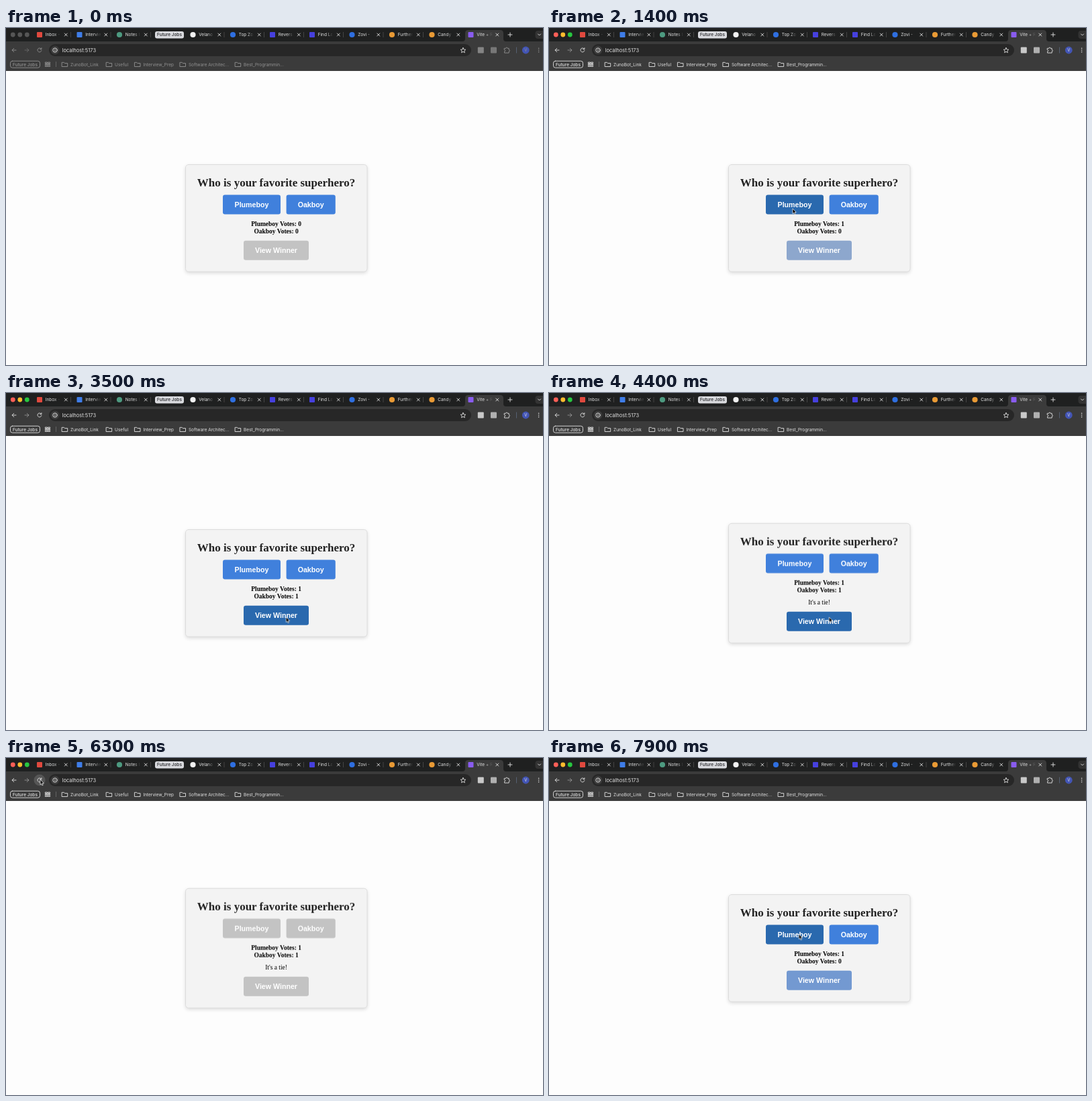
These frames come from a looping animation (800x502 px, 8000 ms). An HTML page:

```html
<!DOCTYPE html>
<html lang="en">
<head>
<meta charset="utf-8">
<title>Superhero vote</title>
<style>
  html, body { margin: 0; width: 100%; height: 100%; overflow: hidden; background: #fdfdfd; }
  svg { display: block; width: 800px; height: 502px; }
  .ui { font-family: Inter, Roboto, sans-serif; font-size: 6.5px; fill: #e3e3e3; }
  .ui .now { fill: currentColor; }
  .line { fill: none; stroke: currentColor; stroke-width: .9; stroke-linecap: round; stroke-linejoin: round; }
  .mid { text-anchor: middle; }
  .serif { font-family: "Liberation Serif", "Times New Roman", serif; font-size: 9.47px; text-anchor: middle; }
  .bold { font-weight: 700; }
  .btn { font: 700 10.65px "Liberation Sans", Arial, sans-serif; fill: #fff; text-anchor: middle; }
  .card { fill: #f3f3f3; stroke: #dcdcdc; filter: drop-shadow(0 2px 2.5px rgba(0, 0, 0, .13)); }
</style>
</head>
<body>
<svg viewBox="0 0 800 502">
  <defs>
    <linearGradient id="fade"><stop stop-color="#1f2020" stop-opacity="0"/><stop offset="1" stop-color="#1f2020"/></linearGradient>
    <linearGradient id="fadeOn"><stop stop-color="#3b3b3b" stop-opacity="0"/><stop offset="1" stop-color="#3b3b3b"/></linearGradient>
  </defs>
  <rect width="800" height="502" fill="#fdfdfd"/>

  <g class="ui">
    <rect width="800" height="64" fill="#1f2020"/>
    <rect y="20" width="800" height="44" fill="#3b3b3b"/>
    <path d="M680 20q4 0 4-4V8q0-5 5-5h47q5 0 5 5v8q0 4 4 4z" fill="#3b3b3b"/>
    <g id="lights"></g>
    <g id="tabs"></g>
    <rect x="222" y="5" width="43" height="10.4" rx="3" fill="#d9dade"/>
    <text class="mid" x="243.5" y="12.4" style="fill:#202124;font-weight:500">Future Jobs</text>
    <path class="line" d="M748 10h6M751 7v6" color="#e3e3e3"/>
    <rect x="788.5" y="4" width="16" height="12" rx="4" fill="#333"/>
    <path class="line" d="M792.6 9l2 2 2-2" color="#e3e3e3"/>
    <rect x="64" y="24" width="629" height="18" rx="9" fill="#272727"/>
    <circle cx="73" cy="33" r="6.5" fill="#3b3b3b"/>
    <circle class="line" cx="73" cy="33" r="3.2" color="#e3e3e3"/>
    <path class="line" d="M73 32.7v1.7M73 31.3v.1" color="#e3e3e3"/>
    <text x="83.6" y="35.7" style="font-size:7.5px">localhost:5173</text>
    <path class="line" d="M681 29.4l1.1 2.5 2.7.3-2 1.8.6 2.7-2.4-1.4-2.4 1.4.6-2.7-2-1.8 2.7-.3z" color="#dcdcdc"/>

    <g id="nav">
      <path class="line" d="M15 33H9.2M11.8 30.3L9.1 33l2.7 2.7"/>
      <path class="line" d="M28 33h5.8M31.2 30.3l2.7 2.7-2.7 2.7" opacity=".5"/>
      <circle id="reloadHover" cx="50" cy="33" r="8.5" fill="#565656"/>
      <path class="line" d="M52.6 31.4a3 3 0 1 0 .3 2.2M52.9 29.6v2.1h-2.1"/>
      <rect class="now" x="702.8" y="28.5" width="9" height="9" rx="1" opacity=".85"/>
      <rect class="now" x="722" y="28.5" width="9" height="9" rx="1" opacity=".7"/>
      <path class="line" d="M742.6 30.3h2.1a1.2 1.2 0 0 1 2.4 0h2.1v2.2a1.2 1.2 0 0 1 0 2.4v2.2h-6.6v-2.2a1.2 1.2 0 0 0 0-2.4z"/>
      <path d="M760.5 28.5v9" stroke="#5c6a80" stroke-width=".8"/>
      <circle cx="774.3" cy="33" r="5.4" fill="#4355b5"/>
      <text class="mid now" x="774.3" y="35.1" style="font-size:6px">V</text>
      <g class="now"><circle cx="793.6" cy="30.2" r=".8"/><circle cx="793.6" cy="33" r=".8"/><circle cx="793.6" cy="35.8" r=".8"/></g>
      <rect class="line" x="6.5" y="49.2" width="44" height="10" rx="3"/>
      <text class="mid now" x="28.5" y="56.6" style="font-weight:500">Future Jobs</text>
      <g id="marks"></g>
    </g>
  </g>

  <g id="shortCard"><rect class="card" x="267.5" y="203.5" width="270.5" height="159.5" rx="4.5"/></g>
  <g id="tallCard">
    <rect class="card" x="267.5" y="194.3" width="270.5" height="178" rx="4.5"/>
    <text class="serif" x="402.6" y="315.4">It's a tie!</text>
  </g>
  <g id="upper">
    <text class="serif bold" x="402.6" y="236" style="font-size:17px" fill="#222">Who is your favorite superhero?</text>
    <rect id="first" x="323" y="248.5" width="86" height="29" rx="3.2"/>
    <text class="btn" x="366" y="267">Plumeboy</text>
    <rect id="second" x="417.6" y="248.5" width="73.2" height="29" rx="3.2"/>
    <text class="btn" x="454.2" y="267">Oakboy</text>
    <g class="serif bold">
      <text id="firstZero" x="402.6" y="295">Plumeboy Votes: 0</text>
      <text id="firstOne" x="402.6" y="295">Plumeboy Votes: 1</text>
      <text id="secondZero" x="402.6" y="306">Oakboy Votes: 0</text>
      <text id="secondOne" x="402.6" y="306">Oakboy Votes: 1</text>
    </g>
  </g>
  <g id="lower">
    <rect id="view" x="354" y="316.7" width="97" height="29" rx="3.2"/>
    <text class="btn" x="402.5" y="335">View Winner</text>
  </g>
  <path id="cursor" d="M0 0v7.6l1.7-1.5 1.2 2.8 1.3-.6-1.2-2.7h2.3z" fill="#000" stroke="#fff" stroke-width=".7"/>
</svg>

<script>
const LOOP = 8000;
const $ = id => document.getElementById(id);

function add(parent, tag, attrs, text) {
  const el = document.createElementNS('http://www.w3.org/2000/svg', tag);
  for (const k in attrs) el.setAttribute(k, attrs[k]);
  if (text) el.textContent = text;
  $(parent).appendChild(el);
  return el;
}

// Rows are [time, value, easing towards the next row]; without easing the value holds.
function play(el, prop, rows) {
  const all = [...rows, [LOOP, rows[rows.length - 1][1]]];
  const frames = all.map(([t, v, ease]) => ({ offset: t / LOOP, [prop]: v, easing: ease || 'step-end' }));
  el.animate(frames, { duration: LOOP, iterations: Infinity }).startTime = 0 + start;
}
const start = document.timeline.currentTime || 0;

// Colour changes [time, colour, cut] fade over 300 ms unless cut.
function tint(id, first, changes) {
  let colour = first;
  const rows = [[0, first]];
  for (const [t, next, cut] of changes) {
    if (!cut) rows.push([t, colour, 'ease']);
    rows.push([Math.min(t + (cut ? 0 : 300), LOOP), next]);
    colour = next;
  }
  if (rows[rows.length - 1][0] === LOOP) rows.pop();
  play($(id), 'fill', last(rows, colour));
}
// Lets a fade that would pass the loop's end stop partway there.
function last(rows, colour) {
  const tail = rows[rows.length - 1];
  return tail[2] ? [...rows.slice(0, -1), [tail[0], tail[1], 'ease'], [LOOP - 1, colour]] : rows;
}

// Shows an element only inside the given spans.
function show(id, ...spans) {
  const rows = spans.flatMap(([a, b]) => [[a, 1], [b, 0]]).filter(r => r[0] < LOOP);
  if (rows[0][0] > 0) rows.unshift([0, 0]);
  play($(id), 'opacity', rows);
}

const tabs = [
  [50, 'Inbox -', '#e0493e'], [109.5, 'Intervie', '#3f7de8'], [169, 'Notes In', '#4d9a80', 1],
  [278.5, 'Velano', '#f2f2f2', 1], [338, 'Top Zo', '#2f6fe0', 1], [397, 'Reverse', '#4640de'],
  [456, 'Find Lo', '#4640de'], [515.5, 'Zovi -', '#2f6fe0', 1], [575, 'Further', '#e99a35', 1],
  [634.5, 'Candy', '#e99a35', 1], [692.5, 'Vite + R', '#8a5cf0']
];
tabs.forEach(([x, title, fill, round], i) => {
  const on = i === tabs.length - 1;
  if (round) add('tabs', 'circle', { cx: x, cy: 10, r: 4.1, fill });
  else add('tabs', 'rect', { x: x - 4, y: 6, width: 8, height: 8, rx: 1, fill });
  add('tabs', 'text', { x: x + 8.7, y: 12.3 }, title);
  add('tabs', 'rect', { x: x + 22, y: 4, width: 9, height: 12, fill: `url(#${on ? 'fadeOn' : 'fade'})` });
  add('tabs', 'rect', { x: x + 31, y: 4, width: 12, height: 12, fill: on ? '#3b3b3b' : '#1f2020' });
  add('tabs', 'path', { class: 'line', d: `M${x + 37.3} 8l4 4m0-4l-4 4`, color: '#e3e3e3' });
  if (i < tabs.length - 2) add('tabs', 'path', { d: `M${x + 46.5} 6v8`, stroke: '#555', 'stroke-width': .7 });
});

for (let i = 0; i < 6; i++) {
  add('marks', 'rect', { class: 'line', x: 58.7 + i % 2 * 4.2, y: 51 + (i >> 1) * 2.5, width: 2.8, height: 1.3, 'stroke-width': .7 });
}
add('marks', 'path', { d: 'M74.5 50v8', stroke: '#777', 'stroke-width': .7 });
[[83.5, 'ZunoBot_Link'], [149.5, 'Useful'], [191.8, 'Interview_Prep'],
 [259.3, 'Software Architec...'], [341.5, 'Best_Programmin...']].forEach(([x, name]) => {
  add('marks', 'path', { class: 'line', d: `M${x} 51.3h3l1 1.2h4.2v5h-8.2z` });
  add('marks', 'text', { class: 'now', x: x + 12.6, y: 56.5 }, name);
});

// The window wakes up when it is first clicked.
const WAKE = 600;
['#ff5f57', '#febc2e', '#28c840'].forEach((colour, i) => {
  const dot = add('lights', 'circle', { cx: 10.3 + i * 10.5, cy: 10, r: 3.4 });
  play(dot, 'fill', [[0, '#565656'], [WAKE, colour]]);
});
play($('nav'), 'color', [[0, '#929292'], [WAKE, '#e3e3e3']]);

const BLUE = '#4080dc', DEEP = '#2a69ae', GREY = '#c3c3c3';
const VOTE1 = 1325, VOTE2 = 2450, TIE = 4400, RESET = 6700, AGAIN = 7770;

tint('first', BLUE, [[850, DEEP], [1650, BLUE], [TIE, GREY], [RESET, BLUE, 1], [7500, DEEP]]);
tint('second', BLUE, [[1750, DEEP], [2520, BLUE], [TIE, GREY], [RESET, BLUE, 1]]);
play($('view'), 'fill', [
  [0, GREY], [VOTE1, GREY, 'ease'], [VOTE1 + 300, BLUE], [2680, BLUE, 'ease'], [2980, DEEP],
  [TIE, DEEP, 'ease'], [TIE + 300, GREY], [RESET, GREY], [AGAIN, GREY, 'ease'], [LOOP - 1, '#6792d3']
]);

show('firstZero', [0, VOTE1], [RESET, AGAIN]);
show('firstOne', [VOTE1, RESET], [AGAIN, LOOP]);
show('secondZero', [0, VOTE2], [RESET, LOOP]);
show('secondOne', [VOTE2, RESET]);
show('shortCard', [0, TIE], [RESET, LOOP]);
show('tallCard', [TIE, RESET]);
show('reloadHover', [5400, 7050]);
show('cursor', [400, LOOP]);

const shift = y => `translate(0px, ${y}px)`;
play($('upper'), 'transform', [[0, shift(0)], [TIE, shift(-9.2)], [RESET, shift(0)]]);
play($('lower'), 'transform', [[0, shift(0)], [TIE, shift(9)], [RESET, shift(0)]]);

const path = [
  [0, 340, 376], [600, 340, 376], [1000, 363, 269], [1500, 363, 269], [2000, 435, 269.7], [2480, 435, 269.7],
  [2720, 417.3, 333.8], [4480, 417.3, 333.8], [5000, 133.8, 116.3], [5400, 51, 32], [6750, 51, 32],
  [7000, 45.5, 60.8], [7250, 75, 80], [7650, 372.3, 262.3]
];
play($('cursor'), 'transform', path.map(([t, x, y]) => [t, `translate(${x}px, ${y}px)`, 'ease-in-out']));
</script>
</body>
</html>
```
